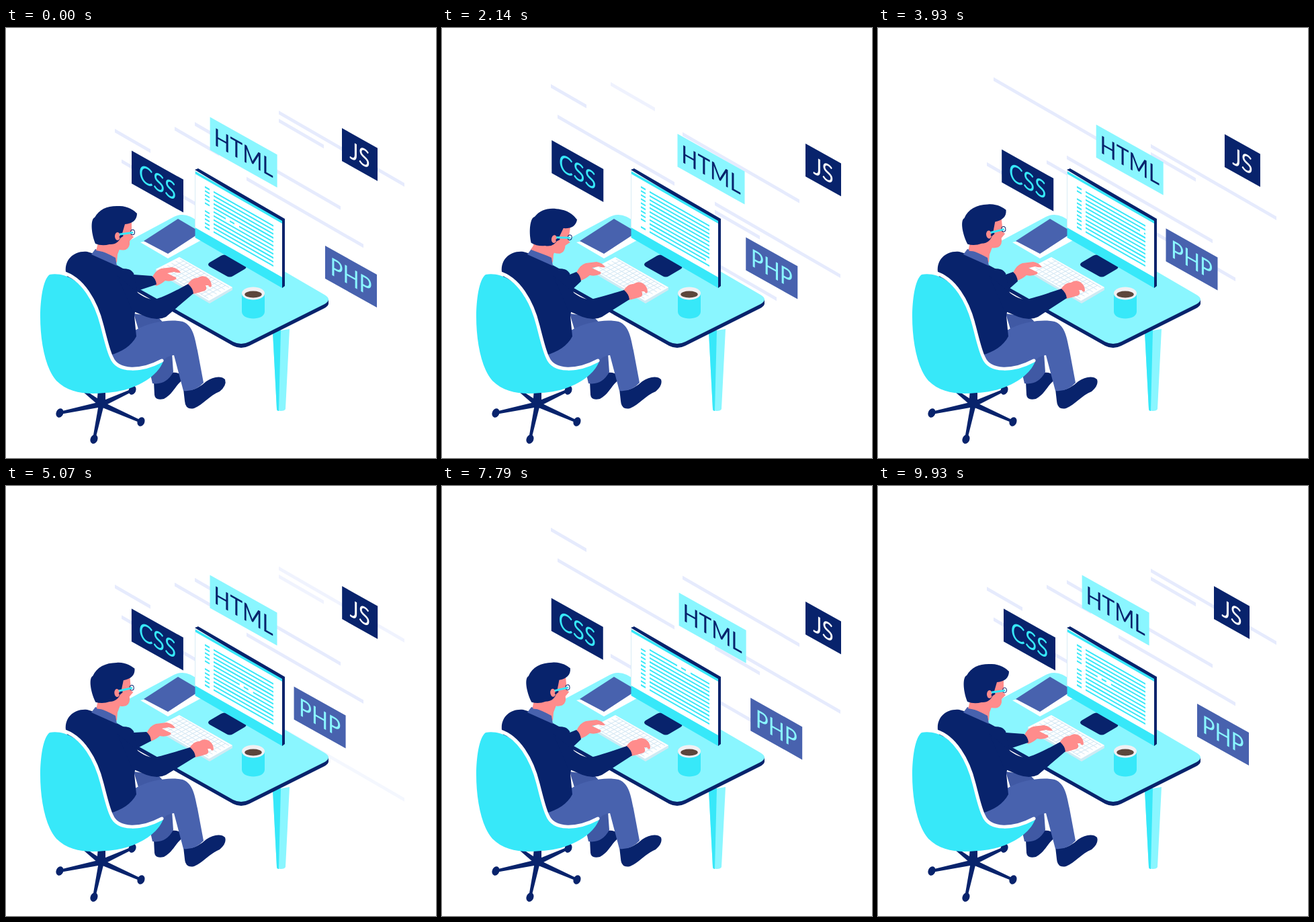
Recreate the animation shown at these times as an HTML page. Size 640x640 px, loop 10000 ms.

```html
<!DOCTYPE html>
<html lang="en">
<head>
<meta charset="utf-8">
<title>Developer at work</title>
<style>
html,body{margin:0;width:100%;height:100%;overflow:hidden;background:#fff}
svg{display:block;width:100%;height:100%}
text{font-family:Lato,sans-serif;font-size:36.5px;text-anchor:middle}
</style>
</head>
<body>
<svg id="stage" viewBox="0 0 640 640"></svg>
<script>
const NAVY = '#08236c', CYAN = '#37e8f9', LIGHT = '#8af6ff', BLUE = '#4862ae', SKIN = '#ff8c8c', PALE = '#e6ebfd';
// the last picture repeats the first one for a moment
const LOOP = 10000, END = 9930, HALF = END / 2;

const shape = (d, fill, extra = '') => `<path d="${d}" fill="${fill}" ${extra}/>`;
const stroke = (d, color, width, extra = '') =>
  `<path d="${d}" fill="none" stroke="${color}" stroke-width="${width}" stroke-linecap="round" stroke-linejoin="round" ${extra}/>`;
const oval = (x, y, rx, ry, fill, extra = '') => `<ellipse cx="${x}" cy="${y}" rx="${rx}" ry="${ry}" fill="${fill}" ${extra}/>`;

// drifting streaks: left, right, height at loop start, moment of wrapping
const streaks = [
  [162, 215, 150, 3050], [172, 346, 195.5, 4050], [251, 317, 147, 2050], [281, 498, 140, 1300],
  [358, 532, 221.5, 3050], [406, 593, 123, 0], [406, 473, 135, 0]
];
const streakShapes = streaks.map(([a, b]) => {
  const w = b - a, h = w * .577;
  const p = `M0 0L${w} ${h}v5.5L0 5.5Z`;
  return shape(p, PALE) + shape(p, PALE);
}).join('');

const labels = [
  { text: 'CSS', x: 187, y: 182.5, w: 77, bg: NAVY, fg: CYAN },
  { text: 'HTML', x: 303.5, y: 132.5, w: 100, bg: LIGHT, fg: NAVY },
  { text: 'JS', x: 500, y: 149, w: 53, bg: NAVY, fg: '#fff' },
  { text: 'PHP', x: 475, y: 324, w: 77, bg: BLUE, fg: LIGHT }
];
// isometric wall: horizontal lengths shrink by cos 30
const ISO = .866;
const labelShapes = labels.map(l =>
  `<g><rect width="${l.w}" height="49" fill="${l.bg}"/>` +
  `<text transform="translate(${l.w / 2} 38) scale(${ISO} 1)" fill="${l.fg}">${l.text}</text></g>`).join('');

let keys = '';
for (let i = 1; i < 14; i++) keys += `M${.04 + i * .92 / 14} .06V.94`;
for (let i = 0; i < 6; i++) keys += `M.04 ${.06 + i * .176}H.96`;

const desk = 'M166 326L250 281Q262 275 275 281L474 397Q486 404 474 411L362 467Q350 473 338 467L150 361Z';

const furniture =
  shape('M397 452L422 448L416 567Q415 570 409 570Q403 570 403 567Z', LIGHT) +
  shape('M397 452L409 450L406 570Q403 570 403 567Z', CYAN) +
  shape(desk, NAVY, 'transform="translate(0 6)"') +
  shape('M474 404H480V410L470 416Z', NAVY) +
  shape(desk, LIGHT) +
  shape('M200 319L241 343L292 315L286 300Z', '#fff') +
  shape('M205 317L256 284L290 304L241 336Z', BLUE) +
  shape('M303 349L320 339Q325 336 330 339L355 353Q360 356 355 359L338 369Q333 372 328 369L303 355Q299 352 303 349Z', NAVY) +
  shape('M281 211L286 209L415 284V384L411 387V290Z', NAVY) +
  shape('M281.500 213L411 287V387L281.500 312Z', CYAN) +
  shape('M281.500 217L411 291V371L281.500 297Z', '#fff') +
  stroke('M281.500 214V297', '#dce9f3', .8) +
  `<path id="code" transform="matrix(1 .57 0 1 296 235.500)" fill="none" stroke="${CYAN}" stroke-width="2.300"/>` +
  shape('M223 359L258 341L337 386V390L303 410L223 363Z', '#cfeaf3') +
  shape('M223 359L258 341L337 386L302 406Z', '#fff') +
  stroke(keys, '#cfe5f3', 1, 'transform="matrix(79 46 -35 18 258 341)" vector-effect="non-scaling-stroke"') +
  shape('M351 395V422C351 436 385 436 385 422V395Z', CYAN) +
  oval(368, 395, 17, 9.5, '#f1f0f3') + oval(368, 396.5, 12.7, 5, '#5c463c');

// spoke that narrows from the hub to its wheel
function spoke(x, y) {
  const dx = x - 142, dy = y - 560, len = Math.hypot(dx, dy);
  const nx = -dy / len, ny = dx / len;
  return shape(`M${142 + nx * 4} ${560 + ny * 4}L${x + nx * 2} ${y + ny * 2}L${x - nx * 2} ${y - ny * 2}L${142 - nx * 4} ${560 - ny * 4}Z`, NAVY);
}
const wheels = [[80, 573], [131, 612], [201, 586], [188, 539]];
const chairBase = spoke(117, 541) +
  wheels.map(([x, y]) => spoke(x, y) + oval(x, y, 5.3, 7, NAVY, `transform="rotate(22 ${x} ${y})"`)).join('') +
  shape('M137 538H148V562Q142 567 135 562Z', NAVY);

const legs =
  shape('M220 526C230 533 240 516 248 513C258 512 264 517 263 524C253 530 249 545 235 552Q222 555 221 546Z', NAVY) +
  shape('M190 425L225 430Q240 440 246 470L249 512Q238 532 218 529L208 485Z', '#4059a4') +
  shape('M264 537C276 543 289 534 298 526C308 519 320 517 326 523Q329 532 318 541C303 547 294 560 280 566Q267 569 266 555Z', NAVY) +
  shape('M155 486L192 450C215 437 245 433 263 437C279 443 281 462 285 480L294 528Q281 542 264 540L250 487Q240 487 231 498L200 513L165 506Z', BLUE);

const torso =
  shape('M89 363C87 344 102 331 121 333L131 336L165 353L176 359Q184 357 190 365L197 400L191 428L194 459C187 473 172 482 155 487L110 440Z', NAVY) +
  shape('M137 319L171 324L166 337L165 349L134 333Z', SKIN) +
  shape('M133 329Q149 334 163 342L165 354L127 337Z', BLUE);

const chair =
  shape('M65 367C85 363 112 375 127 405C143 437 147 468 156 489C164 514 198 514 234 496C224 523 184 542 147 543C119 546 93 543 75 525C58 506 51 465 51 430C51 405 55 374 65 367Z', CYAN) +
  stroke('M84 364C114 372 134 407 143 443C149 466 152 480 157 490C166 513 202 511 232 495', '#fff', 5);

const head =
  shape('M141 316L178 290L187 289V308L190 311L184 317Q185 327 178 330Q169 332 162 327L164 337L134 331Z', SKIN) +
  shape('M133 321C126 303 126 284 132 282C139 269 152 264 169 265C182 265 191 272 195 276C195 286 188 291 177 292L172 309Q167 323 154 322Q143 325 133 321Z', NAVY) +
  oval(166, 310, 4, 6, SKIN) +
  stroke('M170 311L173 309', NAVY, 3) +
  oval(188.5, 304, 3, 3.8, '#fff', `fill-opacity=".35" stroke="${NAVY}" stroke-width="1"`) +
  stroke('M170 307L188 304.500', CYAN, 3);

const farHand =
  shape('M200 364Q206 352 214 350L230 348Q238 349 243 356Q239 357 233 355L223 357L233 362Q238 363 236 366Q228 370 220 368Q213 374 206 376Z', SKIN);
const nearHand =
  shape('M270 391Q277 380 285 381Q292 376 299 380Q306 385 306 393Q304 397 301 392L297 392Q300 397 296 400Q287 403 278 405Z', SKIN);

document.getElementById('stage').innerHTML =
  `<g id="streaks">${streakShapes}</g><g id="labels">${labelShapes}</g>` +
  furniture + chairBase + legs +
  `<g id="farHand">${farHand}</g><path id="farArm" fill="${NAVY}"/>` +
  torso + `<g id="head">${head}</g>` +
  `<g id="nearHand">${nearHand}</g><path id="nearArm" fill="${NAVY}"/>` + chair;

const el = id => document.getElementById(id);
const parts = {};
['code', 'farHand', 'farArm', 'nearHand', 'nearArm', 'head'].forEach(id => parts[id] = el(id));
const streakEls = [...el('streaks').children], labelEls = [...el('labels').children];

const clamp = v => Math.min(1, Math.max(0, v));
const wave = u => (1 - Math.cos(Math.PI * clamp(u))) / 2;
// rises until peak, falls back until end
const swing = (t, peak, end) => t < peak ? wave(t / peak) : wave((end - t) / (end - peak));
function track(keys, t) {
  let i = 1;
  while (i < keys.length - 1 && keys[i][0] < t) i++;
  const [a, b] = [keys[i - 1], keys[i]];
  const u = wave((t - a[0]) / (b[0] - a[0]));
  return a.slice(1).map((v, k) => v + (b[k + 1] - v) * u);
}

const headKeys = [[0, 0], [1100, 9], [2000, 9.4], [3800, -5.7], [4850, -5.7], [6100, 9.4], [6850, 9.4], [7900, -5.7], [8600, -5.7], [9600, 0], [END, 0]];
const farKeys = [[0, 17, 8], [1200, 0, 0], [2140, 0, 0], [3930, 1, 0], [5070, 9, 4], [6300, 0, 0], [7790, 0, 0], [9600, 17, 8], [END, 17, 8]];
const nearKeys = [[0, 0, -9], [1200, 1, -2], [2140, 0, 0], [3930, 2, -2], [5070, 3, -1], [6790, 2, -2], [7790, 4, -3], [9600, 0, -9], [END, 0, -9]];

function drawStreaks(p) {
  streaks.forEach(([x, , y, wrap], i) => {
    const fade = clamp((p - wrap) / 250);
    const ys = [y - .0311 * p, y + .048 * (HALF - p)];
    ys.forEach((v, k) => {
      const e = streakEls[i * 2 + k];
      e.setAttribute('transform', `translate(${x} ${v})`);
      e.setAttribute('opacity', k ? fade : 1 - fade);
    });
  });
}

function drawLabels(t, p) {
  const css = swing(p, 2580, 4300), html = swing((p + HALF - 80) % HALF, HALF / 2, HALF);
  const js = swing(p, HALF / 2, HALF), php = swing(t, 4430, END);
  const moves = [[-25.5 * css, -16.7 * css], [50.5 * html, 27 * html], [43 * js, 24 * js], [-48 * php, -26.5 * php]];
  labels.forEach((l, i) => labelEls[i].setAttribute('transform',
    `matrix(1 .56 0 1 ${l.x + moves[i][0]} ${l.y + moves[i][1]})`));
}

// rows are retyped one after another from top to bottom
function drawCode(p) {
  const rows = 11, pos = (5.2 + p / HALF * rows) % rows;
  const now = Math.floor(pos), x = 13 + (pos - now) * 89;
  let d = '';
  const bar = (a, b, y) => { if (b > a) d += `M${a} ${y}H${b}`; };
  for (let i = 0; i < rows; i++) {
    const y = 1 + i * 5.95;
    if (i === now) {
      bar(13, x, y);
      bar(x + 6, Math.min(x + 13, 102), y);
      bar(x + 20, 102, y);
    } else {
      bar(0, 7, y);
      bar(13, 102, y);
    }
  }
  parts.code.setAttribute('d', d);
}

function drawMan(t) {
  const [a] = track(headKeys, t), [fx, fy] = track(farKeys, t), [nx, ny] = track(nearKeys, t);
  parts.head.setAttribute('transform', `rotate(${a} 141 318)`);
  parts.farHand.setAttribute('transform', `translate(${fx} ${fy})`);
  parts.nearHand.setAttribute('transform', `translate(${nx} ${ny})`);
  parts.farArm.setAttribute('d',
    `M172 358Q183 357 190 367L${200 + fx} ${363 + fy * .75}Q${206 + fx} ${368 + fy * .6} ${207 + fx} ${377 + fy * .6}L190 393L175 398Z`);
  parts.nearArm.setAttribute('d',
    `M165 368L187 386Q205 404 221 404Q235 401 ${271 + nx} ${390 + ny}Q${278 + nx} ${396 + ny} ${279 + nx} ${404 + ny}` +
    `L238 430Q226 436 209 430L188 421Z`);
}

function draw(ms) {
  const t = Math.min(ms % LOOP, END), p = t % HALF;
  drawStreaks(p);
  drawLabels(t, p);
  drawCode(p);
  drawMan(t);
}

const start = performance.now();
function tick() {
  draw(performance.now() - start);
  requestAnimationFrame(tick);
}
draw(0);
requestAnimationFrame(tick);
</script>
</body>
</html>
```
